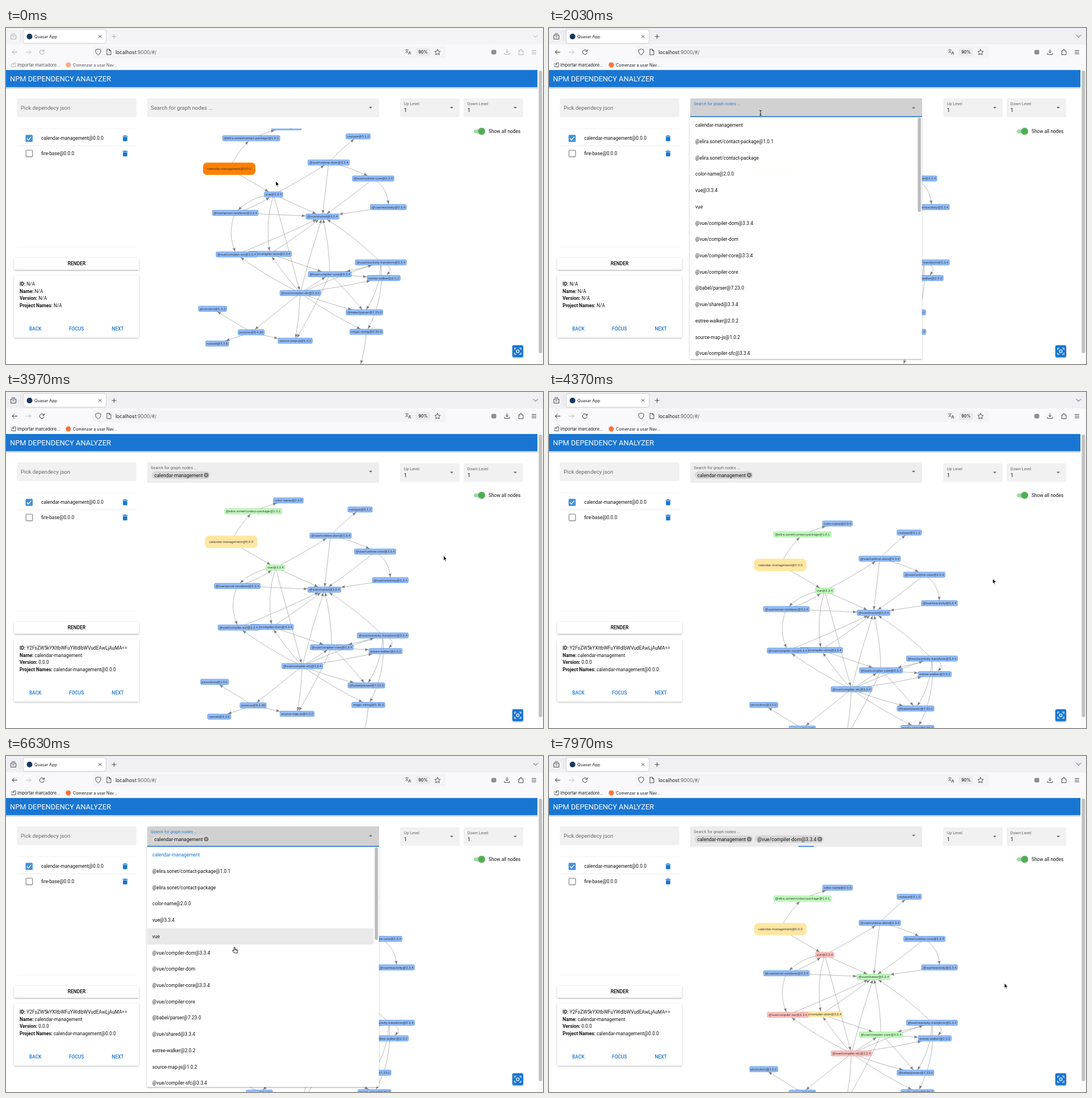
Write an HTML page with a canvas that moves like this. It is 947 px wide and 592 px high and loops after 8000 ms.

```html
<!DOCTYPE html>
<html lang="en">
<head>
<meta charset="utf-8">
<title>NPM Dependency Analyzer</title>
<style>
html, body { margin: 0; width: 100%; height: 100%; overflow: hidden; background: #fff; }
canvas { display: block; width: 947px; height: 592px; }
</style>
</head>
<body>
<canvas id="stage" width="947" height="592"></canvas>
<script>
const g = document.getElementById('stage').getContext('2d');
const LOOP = 8000, BLUE = '#1976d2', GREY = '#757575', INK = '#141414';
const ROBOTO = 'Roboto, sans-serif', INTER = 'Inter, sans-serif', ARIAL = '"Liberation Sans", Arial, sans-serif';

// Moments of the interaction
const ACTIVATE = 870, PICK_A = 2650, PICK_B = 7110, DRAG = [3770, 4400];
const FOCUS = [[1800, 3200], [5700, 7668]];

const clamp = v => Math.max(0, Math.min(1, v));
const smooth = v => { v = clamp(v); return v * v * (3 - 2 * v); };
const mix = (a, b, k) => a + (b - a) * k;

// Cursor path: time, x, y
const PATH = [
  [0, 475.5, 269.5], [60, 475.5, 269.5], [650, 380, 142], [870, 380, 142], [1300, 373, 150],
  [2150, 373, 150], [2500, 335, 172], [2700, 335, 172], [3120, 788, 257], [3300, 788, 257],
  [3700, 768, 275], [3770, 768, 275], [4400, 782.4, 329], [4600, 732, 300], [5250, 473, 155],
  [5950, 473, 155], [6480, 405, 315], [6630, 403, 337], [6800, 400, 347], [7110, 400, 347],
  [7560, 803, 400], [8000, 803, 400]
];
function cursorAt(t) {
  let i = 1;
  while (i < PATH.length - 1 && PATH[i][0] < t) i++;
  const [t0, x0, y0] = PATH[i - 1], [t1, x1, y1] = PATH[i];
  const k = smooth((t - t0) / (t1 - t0));
  return { x: mix(x0, x1, k), y: mix(y0, y1, k) };
}

// Progress of something that opens and closes with the field focus
function focusLevel(t, up, down) {
  let v = 0;
  for (const [a, b] of FOCUS) {
    if (t >= a) v = t < b ? smooth((t - a) / up) : 1 - smooth((t - b) / down);
  }
  return v;
}

function text(s, x, y, size, color = INK, weight = 400, align = 'left', family = ROBOTO) {
  g.font = `${weight} ${size}px ${family}`;
  g.textAlign = align;
  g.fillStyle = color;
  g.fillText(s, x, y + size * 0.355);
  return g.measureText(s).width;
}
function box(x, y, w, h, fill, r = 0, stroke, lw = 1) {
  g.beginPath();
  g.roundRect(x, y, w, h, r);
  if (fill) { g.fillStyle = fill; g.fill(); }
  if (stroke) { g.strokeStyle = stroke; g.lineWidth = lw; g.stroke(); }
}
function disc(x, y, r, fill, stroke, lw = 1) {
  g.beginPath();
  g.arc(x, y, r, 0, 7);
  if (fill) { g.fillStyle = fill; g.fill(); }
  if (stroke) { g.strokeStyle = stroke; g.lineWidth = lw; g.stroke(); }
}
function path(d, x, y, stroke, lw = 1, fill) {
  const p = new Path2D(d);
  g.save();
  g.translate(x, y);
  if (fill) { g.fillStyle = fill; g.fill(p); }
  if (stroke) { g.strokeStyle = stroke; g.lineWidth = lw; g.stroke(p); }
  g.restore();
}
// White sheet whose shadow stays outside it, so it can fade cleanly
function raised(x, y, w, h, r = 2) {
  g.save();
  g.beginPath();
  g.rect(0, 0, 947, 592);
  g.rect(x, y, w, h);
  g.clip('evenodd');
  g.shadowColor = 'rgba(0,0,0,.35)';
  g.shadowBlur = 3;
  g.shadowOffsetY = 1;
  box(x, y, w, h, '#fff', r);
  g.restore();
  box(x, y, w, h, '#fff', r);
}
function caret(x, y, turn = 0) {
  g.save();
  g.translate(x, y);
  g.rotate(turn * Math.PI);
  path('M-3 -1.5H3L0 1.5Z', 0, 0, null, 0, '#666');
  g.restore();
}

// Graph: key, label, centre
const NODES = [
  ['col', 'color-name@2.0.0', 494.5, 175], ['con', '@elira.sonet/contact-package@1.0.1', 432.5, 194.3],
  ['cal', 'calendar-management@0.0.0', 393.6, 248], ['vue', 'vue@3.3.4', 471.8, 293.4],
  ['css', 'csstype@3.1.2', 621, 191], ['rdom', '@vue/runtime-dom@3.3.4', 569, 237],
  ['rcore', '@vue/runtime-core@3.3.4', 647.5, 265.2], ['rea', '@vue/reactivity@3.3.4', 674.3, 315.5],
  ['srv', '@vue/server-renderer@3.3.4', 404.4, 325.8], ['shr', '@vue/shared@3.3.4', 558, 332.3],
  ['dom', '@vue/compiler-dom@3.3.4', 465.5, 398], ['ssr', '@vue/compiler-ssr@3.3.4', 406.6, 399],
  ['rt', '@vue/reactivity-transform@3.3.4', 661, 413], ['core', '@vue/compiler-core@3.3.4', 571, 433.8],
  ['est', 'estree-walker@2.0.2', 666, 440.5], ['sfc', '@vue/compiler-sfc@3.3.4', 519, 467],
  ['bab', '@babel/parser@7.23.0', 632, 501], ['mag', 'magic-string@0.30.3', 635.5, 535.4],
  ['pic', 'picocolors@1.0.0', 364.4, 494.7], ['pos', 'postcss@8.4.30', 432.4, 536.2],
  ['nan', 'nanoid@3.3.6', 372.5, 556], ['map', 'source-map-js@1.0.2', 510, 551], ['cod', '', 624, 597]
].map(([key, label, x, y]) => ({ key, label, x, y }));
const byKey = Object.fromEntries(NODES.map(n => [n.key, n]));

// from>to:bend
const EDGES = `cal>con:-6 cal>vue con>col:-3 vue>rdom:3 vue>srv:15 srv>vue:7 vue>shr vue>dom:13 vue>sfc
  rdom>css:-4 rdom>rcore:-6 rdom>shr rcore>shr:-3 rcore>rea:-16 rea>shr srv>shr srv>ssr:17
  ssr>shr:3 ssr>dom dom>shr:3 dom>core sfc>shr:-3 sfc>core sfc>dom:-3 sfc>ssr:-6 sfc>rt:-5 sfc>est:3
  sfc>bab:5 sfc>mag:6 sfc>map:-3 sfc>pos core>shr:6 core>bab:-3 core>est core>map:-4 rt>core:-4
  rt>shr:8 rt>est:-28 rt>bab:-14 rt>mag:-20 mag>cod:-4 pos>pic pos>nan pos>map:3`
  .match(/\S+/g).map(s => {
    const [, from, to, bend] = s.match(/(\w+)>(\w+):?(.*)/);
    return { a: byKey[from], b: byKey[to], bend: +bend };
  });

function sizeNodes() {
  g.font = `5.88px ${ARIAL}`;
  for (const n of NODES) {
    const m = n.key === 'cal' ? 7 : 2.1;
    n.w = n.label ? g.measureText(n.label).width + m * 2 : 70;
    n.h = n.key === 'cal' ? 21.2 : 9.4;
  }
}

const PAINT = {
  blue: ['#94bdf8', '#3f82e2'], orange: ['#ff8000', '#ff8000'], yellow: ['#ffe7a3', '#ffe49a'],
  green: ['#c4fcc0', '#7fd67c'], red: ['#ffc0c0', '#eb8f8f']
};
function paintOf(key, t) {
  if (t >= PICK_B) {
    if (key === 'dom') return 'yellow';
    if (['vue', 'sfc', 'ssr'].includes(key)) return 'red';
    if (['core', 'shr'].includes(key)) return 'green';
  }
  if (t >= PICK_A) {
    if (key === 'cal') return 'yellow';
    if (key === 'con' || key === 'vue') return 'green';
  }
  return key === 'cal' ? 'orange' : 'blue';
}

function drawEdge({ a, b, bend }) {
  const dx = b.x - a.x, dy = b.y - a.y, len = Math.hypot(dx, dy);
  const cx = (a.x + b.x) / 2 - dy / len * bend, cy = (a.y + b.y) / 2 + dx / len * bend;
  g.beginPath();
  g.moveTo(a.x, a.y);
  g.quadraticCurveTo(cx, cy, b.x, b.y);
  g.stroke();
  // Walk back along the curve to the border of the end node
  const at = k => [
    (1 - k) ** 2 * a.x + 2 * k * (1 - k) * cx + k * k * b.x,
    (1 - k) ** 2 * a.y + 2 * k * (1 - k) * cy + k * k * b.y
  ];
  let k = 1, p = at(1);
  while (k > 0 && Math.abs(p[0] - b.x) < b.w / 2 + 0.4 && Math.abs(p[1] - b.y) < b.h / 2 + 0.4) p = at(k -= 0.004);
  const q = at(k - 6 / len);
  g.save();
  g.translate(p[0], p[1]);
  g.rotate(Math.atan2(p[1] - q[1], p[0] - q[0]));
  path('M0 0L-6.6 -2.6L-5.6 0L-6.6 2.6Z', 0, 0, null, 0, '#7c7c7c');
  g.restore();
}

function drawGraph(t, grow) {
  const k = smooth((t - DRAG[0]) / (DRAG[1] - DRAG[0]));
  g.save();
  g.beginPath();
  g.rect(248, 177 + grow, 690, 415);
  g.clip();
  g.translate(14.4 * k, 54 * k + grow);
  g.strokeStyle = '#8c8c8c';
  g.lineWidth = 0.6;
  EDGES.forEach(drawEdge);
  for (const n of NODES) {
    if (!n.label) continue;
    const [fill, line] = PAINT[paintOf(n.key, t)];
    box(n.x - n.w / 2, n.y - n.h / 2, n.w, n.h, fill, n.key === 'cal' ? 6.5 : 2, line, 0.6);
    text(n.label, n.x, n.y, 5.88, '#343434', 400, 'center', ARIAL);
  }
  g.restore();
}

function drawBrowser(t) {
  const on = clamp((t - ACTIVATE) / 150);
  const v = Math.round(mix(165, 50, on)), ink = `rgb(${v},${v},${v + 3})`;
  const label = `rgb(${v / 2},${v / 2},${v / 2})`, dark = '#3c3c40', faint = '#bdbdc0';
  box(0, 0, 947, 29, on > 0.5 ? '#f0f0f4' : '#f4f4f6');
  box(0, 29, 947, 45, '#f9f9fb');
  box(153, 32, 623, 21, '#f4f4f7', 2);
  g.save();
  g.shadowColor = 'rgba(0,0,0,.4)';
  g.shadowBlur = 2;
  box(31, 3, 145, 23.5, '#fff', 3);
  g.restore();
  path('M0 3H9V10H0ZM1.5 0.5H7.5M2.5 6H6.5', 8.5, 9.5, ink, 0.9);
  box(25.5, 5, 0.7, 19, '#cfcfd4');
  disc(41.5, 15, 5, '#16375f');
  text('Quasar App', 50, 15, 7.2, '#1b1b1f', 400, 'left', INTER);
  path('M0 0L5 5M5 0L0 5', 163.2, 12.3, dark, 0.9);
  path('M0 4H8M4 0V8', 186.5, 11, ink, 0.9);
  path('M1 0L5 4L9 0', 929, 12.5, ink, 0.9);
  path('M9.5 4H0.5M4.5 0L0.5 4L4.5 8', 10.5, 38.5, ink, 1);
  path('M0 4H9M5 0L9 4L5 8', 35, 38.5, faint, 1);
  path('M8 2.2A4 4 0 1 0 8.5 5M8.6 -0.2V2.8H5.6', 58.8, 38.3, ink, 1);
  path('M4.5 0L9 1.6V4.5Q8.5 8.5 4.5 10.5Q0.5 8.5 0 4.5V1.6Z', 158, 37, dark, 0.9);
  path('M0 0H4.5L7 2.5V9.5H0ZM4.5 0V2.5H7', 178, 37.5, dark, 0.9);
  const host = text('localhost', 193, 42.5, 8.6, '#1b1b1f', 400, 'left', INTER);
  text(':9000/#/', 193 + host, 42.5, 8.6, '#5f5f68', 400, 'left', INTER);
  text('文', 703.5, 40.5, 7, dark, 400, 'left', '"Noto Sans CJK SC", "Noto Sans CJK JP", sans-serif');
  text('A', 709.5, 44.5, 7, dark, 500, 'left', INTER);
  box(723, 36, 25, 13, '#e9e9ee', 2.5);
  text('90%', 735.5, 42.5, 7.2, '#1b1b1f', 500, 'center', INTER);
  path('M5 0L6.5 3.4L10 3.8L7.4 6.2L8.1 9.8L5 8L1.9 9.8L2.6 6.2L0 3.8L3.5 3.4Z', 756, 37.5, dark, 0.9);
  box(856, 38.5, 8.5, 8, '#8d8d92', 2);
  path('M4.5 0V6M1.7 3.4L4.5 6.2L7.3 3.4M0 6.5V9H9V6.5', 879, 37.5, ink, 0.9);
  path('M0 3H2.5V1.5A1.4 1.4 0 0 1 5.3 1.5V3H8V9.5H0V7A1.3 1.3 0 0 0 0 4.5Z', 904, 37.5, ink, 0.9);
  path('M0 0H8M0 3H8M0 6H8', 927, 39.5, ink, 0.9);
  path('M4 1H8V8H1V5M0 3H5M3.5 1.5L5 3L3.5 4.5', 9, 60.5, ink, 0.8);
  text('Importar marcadore...', 20, 65, 7.35, label, 400, 'left', INTER);
  disc(109.8, 65, 4.6, on > 0.5 ? '#ff7139' : '#ffa98a');
  text('Comenzar a usar Nav...', 118, 65, 7.1, label, 400, 'left', INTER);
}

function checkbox(y, on) {
  if (on) {
    box(34.5, y - 6, 12.5, 12.5, '#4590da', 1.5);
    path('M2.5 6.5L5 9L10 3.5', 34.5, y - 6, '#fff', 1.4);
  } else box(35.2, y - 5.7, 11.6, 11.6, '#fff', 1.5, '#7a7a7a', 1.1);
}
function project(name, y, on) {
  checkbox(y, on);
  text(name, 62, y, 8.4);
  path('M0 0.8H2.3L3 0H6L6.7 0.8H9V2H0ZM0.7 2.8H8.3V9Q8.3 10.3 7 10.3H2Q0.7 10.3 0.7 9Z', 205.5, y - 5, null, 0, BLUE);
}
function level(label, x, shift) {
  box(x, 124 + shift, 105, 33, '#f1f1f1', 2);
  text(label, x + 6.8, 133.5 + shift, 7.2, '#666');
  text('1', x + 6.8, 145 + shift, 9.6);
  caret(x + 91, 140.5 + shift);
}

function drawPage(t, grow) {
  const shade = g.createLinearGradient(0, 104, 0, 108);
  shade.addColorStop(0, 'rgba(0,0,0,.28)');
  shade.addColorStop(1, 'rgba(0,0,0,0)');
  box(0, 104, 937.4, 4, shade);
  box(0, 74, 937.4, 30, BLUE);
  text('NPM DEPENDENCY ANALYZER', 7, 89.3, 12.85, '#fff');
  box(937.4, 74, 9.6, 518, '#fafafa');
  box(939.5, 75, 6, 498, '#c2c2c2', 3);

  box(19, 124, 211, 33, '#f1f1f1', 2);
  text('Pick dependecy json', 26, 140.2, 9.6, '#6a6a6a');
  for (const y of [177, 207, 385.5]) box(20, y, 211, 0.8, y === 207 ? '#e6e6e6' : '#efefef');
  project('calendar-management@0.0.0', 194.3, true);
  project('fire-base@0.0.0', 221, false);

  raised(14.5, 405, 220, 21);
  text('RENDER', 124.5, 415.2, 8.4, '#000', 500, 'center');
  raised(14.5, 436, 220, 109.5);
  const picked = t >= PICK_A;
  const info = [
    ['ID:', 'Y2FsZW5kYXItbWFuYWdlbWVudEAwLjAuMA=='], ['Name:', 'calendar-management'],
    ['Version:', '0.0.0'], ['Project Names:', 'calendar-management@0.0.0']
  ];
  info.forEach(([key, value], i) => {
    const y = 451.5 + i * 12.5, w = text(key, 24, y, 8.4, INK, 700);
    text(picked ? value : 'N/A', 26 + w, y, 8.4);
  });
  ['BACK', 'FOCUS', 'NEXT'].forEach((s, i) => text(s, 51.7 + i * 72.7, 530.3, 8.4, BLUE, 500, 'center'));

  level('Up Level', 695, grow / 2);
  level('Down Level', 807, grow / 2);
  box(825, 178.7, 19, 7, '#a6d7a8', 3.5);
  g.save();
  g.shadowColor = 'rgba(0,0,0,.35)';
  g.shadowBlur = 2;
  disc(838.8, 182, 6, '#4caf50');
  g.restore();
  text('Show all nodes', 851, 182.3, 8.4);

  raised(893, 559, 19, 21);
  box(893, 559, 19, 21, BLUE, 2);
  path('M0 3V0H3M8 0H11V3M11 8V11H8M3 11H0V8', 897, 564, '#fff', 1.2);
  disc(902.5, 569.5, 2.4, null, '#fff', 1.2);
}

const CHIP = 8.55;
function chip(label, x, y) {
  g.font = `${CHIP}px ${ROBOTO}`;
  const w = g.measureText(label).width;
  box(x, y - 6.8, w + 17, 13.4, '#d7d7d7', 6.7);
  text(label, x + 4.5, y, CHIP);
  disc(x + w + 10.5, y, 4.1, GREY);
  path('M-1.5 -1.5L1.5 1.5M1.5 -1.5L-1.5 1.5', x + w + 10.5, y, '#e4e4e4', 0.9);
  return x + w + 20.5;
}

const inField = p => p.x > 249 && p.x < 658 && p.y > 124 && p.y < 160;
const isFocused = t => FOCUS.some(([a, b]) => t >= a && t < b);

function drawField(t, grow, cur) {
  const focused = isFocused(t), hover = inField(cur) && !focused;
  const rest = hover ? 230 : grow ? 238 : 241;
  const level = focusLevel(t, 200, 360);
  const v = Math.round(mix(rest, 209, level));
  const bottom = 157 + grow;
  box(249, 124, 409, 33 + grow, `rgb(${v},${v},${v})`, [2, 2, 0, 0]);
  if (hover) box(249, bottom - 1, 409, 1, '#8c8c8c');
  if (level) box(453.5 - level * 204.5, bottom - 1.4, level * 409, 1.4, BLUE);
  const up = t >= PICK_A ? 1 : level;
  text('Search for graph nodes ...', 255.3, mix(140.2, 133.7, up), mix(9.6, 7.2, up), focused ? '#2f7fd0' : '#666');
  if (t >= PICK_A) {
    const x = chip('calendar-management', 257, 146.5);
    if (t >= PICK_B) chip('@vue/compiler-dom@3.3.4', x, 146.5);
  }
  caret(643, 140.3, focusLevel(t, 200, 60));
}

const ITEMS = `calendar-management @elira.sonet/contact-package@1.0.1 @elira.sonet/contact-package color-name@2.0.0
  vue@3.3.4 vue @vue/compiler-dom@3.3.4 @vue/compiler-dom @vue/compiler-core@3.3.4 @vue/compiler-core
  @babel/parser@7.23.0 @vue/shared@3.3.4 estree-walker@2.0.2 source-map-js@1.0.2 @vue/compiler-sfc@3.3.4`.match(/\S+/g);
const ROW = 28.72;

// The last row the pointer touched, slightly delayed
function hotRow(t, top) {
  const open = FOCUS.filter(f => t >= f[0]).pop();
  for (let s = t - 70; s > open[0]; s -= 10) {
    const p = cursorAt(s);
    if (p.x > 249 && p.x < 648 && p.y > top) return Math.floor((p.y - top) / ROW);
  }
  return -1;
}
function drawMenu(t, grow) {
  const alpha = focusLevel(t, 240, 300), top = 157 + grow;
  if (!alpha) return;
  g.save();
  g.globalAlpha = alpha;
  raised(248.5, top, 409, 583 - top, 1);
  g.beginPath();
  g.rect(248.5, top, 409, 583 - top);
  g.clip();
  const hot = hotRow(t, top);
  ITEMS.forEach((s, i) => {
    const y = top + i * ROW;
    if (i === hot) box(248.5, y, 399.5, ROW, t < 5000 ? '#dedede' : '#e9e9e9');
    const picked = i === 0 && t >= PICK_A || i === 6 && t >= PICK_B;
    text(s, 258, y + ROW / 2 - 0.1, 8.4, picked ? BLUE : '#111');
  });
  box(650.3, top + 1, 5.6, 166 - grow, '#bcbcbc', 2.8);
  g.restore();
}

function drawCursor(t, p) {
  if (inField(p)) {
    const beam = 'M-2.2 -5Q0 -5 0 -3.5Q0 -5 2.2 -5M0 -4V4M-2.2 5Q0 5 0 3.5Q0 5 2.2 5M-1.2 1.5H1.2';
    path(beam, p.x, p.y, 'rgba(255,255,255,.7)', 2);
    path(beam, p.x, p.y, '#111', 1);
  } else if (isFocused(t) && p.x > 249 && p.x < 658 && p.y > 157) {
    path('M-1 0.8Q0 -0.6 1 0.8V4L5 5Q6 5.4 5.7 7L5 10.5H-0.5L-3.6 6.5Q-3.4 5.2 -2 5.8L-1 6.6ZM1 4V6M2.8 4.6V6.2M4.2 5V6.5',
      p.x, p.y - 0.5, '#111', 0.9, '#fff');
  } else {
    path('M0 0V9.2L2.1 7.3L3.5 10.6L5 10L3.6 6.8H6.5Z', p.x, p.y, '#fff', 1, '#000');
  }
}

function draw(t) {
  const grow = t >= PICK_A ? 3 : 0, cur = cursorAt(t);
  g.fillStyle = '#fff';
  g.fillRect(0, 0, 947, 592);
  sizeNodes();
  drawGraph(t, grow);
  drawBrowser(t);
  drawPage(t, grow);
  drawField(t, grow, cur);
  drawMenu(t, grow);
  drawCursor(t, cur);
}

const start = performance.now();
function tick() {
  draw((performance.now() - start) % LOOP);
  requestAnimationFrame(tick);
}
tick();
</script>
</body>
</html>
```
